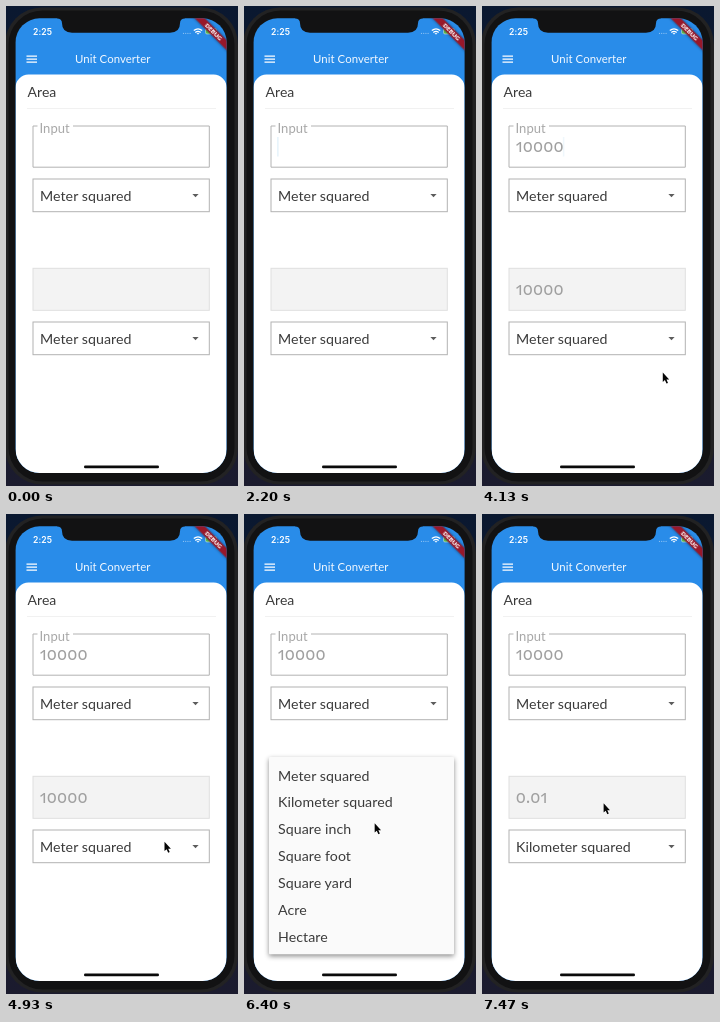
These frames come from a looping animation (232x480 px, 8 s). An HTML page:

```html
<!DOCTYPE html>
<html lang="en">
<head>
<meta charset="utf-8">
<title>Unit Converter</title>
<style>
  html, body { margin: 0; width: 100%; height: 100%; overflow: hidden; background: #11142a; }
  svg { display: block; width: 100vw; height: 100vh; }
  text { font-family: Lato, "Open Sans", sans-serif; font-size: 14.2px; letter-spacing: .06px; fill: #3a3a3a; }
  .number {
    font-family: "Noto Sans", "Open Sans", sans-serif; font-size: 17.2px; font-weight: 300;
    font-feature-settings: "onum", "pnum"; letter-spacing: 0; text-anchor: middle; fill: #a0a0a0;
  }
  .outline { fill: none; stroke: #b2b2b2; }
  #menu { filter: drop-shadow(0 2px 2.5px rgba(0, 0, 0, .45)); }
  #ribbon { filter: drop-shadow(0 0 1.6px rgba(0, 0, 0, .5)); }
</style>
</head>
<body>
<svg viewBox="0 0 232 480">
  <defs>
    <clipPath id="screen"><rect x="9.6" y="12.3" width="211" height="454.700" rx="24"/></clipPath>
    <path id="arrow" d="M186.4 188.1h6.200l-3.100 3.200z" fill="#5c5c5c"/>
    <linearGradient id="desk" x2="0" y2="1">
      <stop stop-color="#0a1830"/><stop offset="1" stop-color="#1b1b2e"/>
    </linearGradient>
  </defs>

  <rect width="232" height="480" fill="url(#desk)"/>
  <rect x="-1" y="1.5" width="233" height="477" rx="37" fill="#222223"/>
  <rect x="2.500" y="4.500" width="226" height="471" rx="34" fill="#121213"/>

  <g clip-path="url(#screen)">
    <rect x="9" y="12" width="212" height="456" fill="#298ce9"/>
    <path d="M9.500 468V81.600a13 13 0 0 1 13-13H207.600a13 13 0 0 1 13 13V468z" fill="#fff"/>

    <text x="27" y="28.500" style="font:600 8.600px Inter,sans-serif;fill:#fff">2:25</text>
    <g fill="#fff" opacity=".45">
      <circle cx="177.5" cy="27.4" r=".6"/><circle cx="179.7" cy="27.4" r=".6"/>
      <circle cx="181.9" cy="27.4" r=".6"/><circle cx="184.1" cy="27.4" r=".6"/>
    </g>
    <g fill="none" stroke="#fff" stroke-width="1.3">
      <path d="M187.8 24.6q4.2-3.4 8.4 0M189.3 26.4q2.7-2 5.4 0"/>
      <path d="M191 27.3h2l-1 1z" fill="#fff" stroke-width=".6"/>
    </g>
    <rect x="199.5" y="22.5" width="11" height="5.5" rx="1.5" fill="#62c554" stroke="#cfe3f8" stroke-width=".6"/>
    <g id="ribbon" transform="translate(207.500 26) rotate(45)">
      <rect x="-40" y="-3.5" width="80" height="7" fill="#98182a"/>
      <text y="2.200" text-anchor="middle" style="font:900 6.100px Lato,sans-serif;fill:#fff">DEBUG</text>
    </g>

    <path d="M20.5 50.1h10.5M20.5 53.1h10.5M20.5 56.1h10.5" stroke="#fff" stroke-width="1.1"/>
    <text x="69" y="57.200" style="font-size:11.400px;fill:#f2f8ff">Unit Converter</text>

    <text x="21.5" y="91" style="font-size:14px">Area</text>
    <path d="M21 102.5H210" stroke="#f1f1f1"/>

    <path class="outline" d="M31.5 120H27V161.200H203.300V120H67"/>
    <text x="33.5" y="127" style="font-size:13px;fill:#a8a8a8">Input</text>
    <text id="input" class="number" y="146.4"></text>
    <rect id="caret" y="131" width="1.5" height="19.5" fill="#3096d8"/>

    <rect class="outline" x="27" y="173" width="176.300" height="32.700"/>
    <text x="34" y="194.900">Meter squared</text>
    <use href="#arrow"/>

    <rect x="27" y="262.3" width="176.300" height="42" fill="#f3f3f3" stroke="#dfdfdf"/>
    <text id="result" class="number" y="289"></text>
    <rect class="outline" x="27" y="316" width="176.300" height="32.700"/>
    <text id="unit" x="34" y="337.900"></text>
    <use href="#arrow" y="143"/>

    <g id="menu">
      <rect id="sheet" x="25" width="185" rx="1" fill="#fafafa"/>
      <g id="items"></g>
    </g>

    <rect x="78" y="459.6" width="75" height="2.7" rx="1.3" fill="#0a0a0a"/>
  </g>

  <path d="M51 11v1.300q5 .4 5 5q0 9.400 10 9.400H164q10 0 10-9.400q0-4.600 5-5V11z" fill="#121213"/>

  <path id="pointer" d="M0 0V9.3L2.1 7.5L3.7 11L5.2 10.3L3.7 7H6.4z"
    fill="#050505" stroke="#fff" stroke-width=".9" paint-order="stroke"/>
</svg>

<script>
const LOOP = 8000;
const LEFT = 33.8;
const ADVANCE = { "0": 10.2, "1": 7, ".": 4.2 };
const UNITS = ["Meter squared", "Kilometer squared", "Square inch", "Square foot",
  "Square yard", "Acre", "Hectare"];
const KEYS = [2270, 2470, 2670, 2930, 3270];
const PICKED = 7260;

// [time, value...] rows, joined by straight lines
const CARET = [[170, 0], [440, 1], [700, 1], [930, 0], [1170, 0], [1400, 1],
  [1650, 1], [1920, 0], [2170, 0], [2269, .4], [2270, 1], [3900, 1], [4150, 0],
  [4430, 0], [4660, 1], [4710, 1], [4930, 0]];
const POINTER = [[3900, 236, 472], [4060, 196, 395], [4200, 166, 339], [4270, 158.5, 327.8],
  [6220, 158.5, 327.8], [6400, 130.8, 309.3], [6530, 113, 294], [6600, 115, 291],
  [6730, 121.6, 289.3]];

const $ = id => document.getElementById(id);
const [input, result, unit, caret, menu, sheet, items, pointer] =
  ["input", "result", "unit", "caret", "menu", "sheet", "items", "pointer"].map($);

UNITS.forEach((name, i) => {
  const line = document.createElementNS("http://www.w3.org/2000/svg", "text");
  line.setAttribute("x", 34);
  line.setAttribute("y", 266.6 + i * 26.85);
  line.textContent = name;
  items.append(line);
});

function set(el, attrs) {
  for (const name in attrs) el.setAttribute(name, attrs[name]);
}

function track(rows, t) {
  const i = rows.findIndex(row => row[0] > t);
  if (i === 0) return rows[0].slice(1);
  if (i < 0) return rows[rows.length - 1].slice(1);
  const a = rows[i - 1], b = rows[i], k = (t - a[0]) / (b[0] - a[0]);
  return a.slice(1).map((v, n) => v + (b[n + 1] - v) * k);
}

// Centres every digit in its own advance; returns the end of the line.
function showNumber(el, digits) {
  let x = LEFT;
  const centres = [...digits].map(d => {
    x += ADVANCE[d];
    return (x - ADVANCE[d] / 2).toFixed(2);
  });
  if (el.textContent !== digits) {
    el.textContent = digits;
    el.setAttribute("x", centres.join(" "));
  }
  return x;
}

function drawMenu(t) {
  const open = t >= 5450 && t < 7450;
  menu.style.display = open ? "" : "none";
  if (!open) return;
  const full = t >= 5600;
  const fade = t < PICKED ? Math.min(1, .35 + (t - 5450) / 120) : 1 - (t - PICKED) / 190;
  menu.style.opacity = Math.max(0, fade);
  set(sheet, full ? { y: 243, height: 197.3 } : { y: 247.5, height: 27 });
  const rest = t < 5690 ? 0 : Math.min(1, (t - 5690) / 100);
  [...items.children].forEach((line, i) => set(line, { opacity: i ? rest : 1 }));
}

function draw(t) {
  const typed = "10000".slice(0, KEYS.filter(k => t >= k).length);
  const end = showNumber(input, typed);
  showNumber(result, t < PICKED ? typed : "0.01");
  unit.textContent = UNITS[t < PICKED ? 0 : 1];
  set(caret, { x: end - .7, opacity: track(CARET, t)[0] });
  drawMenu(t);
  set(pointer, {
    transform: `translate(${track(POINTER, t)})`,
    visibility: t < 3900 ? "hidden" : "visible"
  });
}

const start = performance.now();
function tick() {
  draw((performance.now() - start) % LOOP);
  requestAnimationFrame(tick);
}
tick();
</script>
</body>
</html>
```
